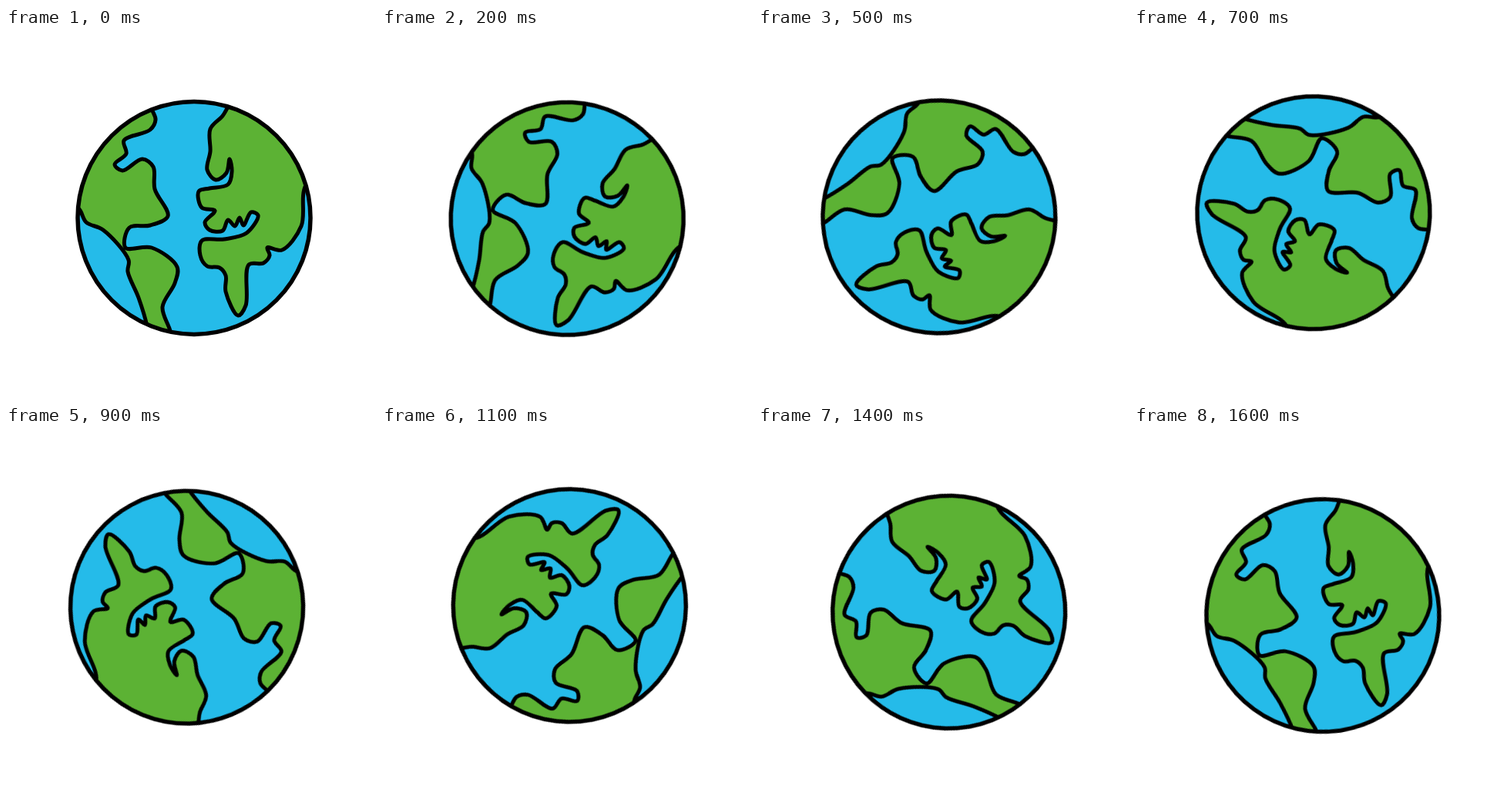
Animation of 480x480 px, one loop 1700 ms. Source, as an HTML page:

```html
<!DOCTYPE html>
<html lang="en">
<head>
<meta charset="utf-8">
<title>Spinning globe</title>
<style>
  html, body { margin: 0; width: 100%; height: 100%; overflow: hidden; background: #fff; }
  svg { display: block; width: 100vw; height: 100vh; }
  #globe { transform-box: view-box; transform-origin: 240.4px 239.8px; }
  .land { fill: #5cb234; stroke: #000; stroke-width: 5; stroke-linejoin: round; }
</style>
</head>
<body>
<svg viewBox="0 0 480 480">
  <clipPath id="disc"><circle cx="244" cy="246.4" r="151"/></clipPath>
  <g id="globe">
    <circle cx="244" cy="246.4" r="151" fill="#25bbe9"/>
    <g clip-path="url(#disc)">
      <path id="west" class="land"/>
      <path id="east" class="land"/>
    </g>
    <circle cx="244" cy="246.4" r="151" fill="none" stroke="#000" stroke-width="5.5"/>
  </g>
</svg>
<script>
// Key points of each coast; the loops close outside the disc
const coasts = {
  west: `189,105 194,119 187,132 153,146 156,163 141,177 151,185 177,170 191,180
    193,209 210,244 187,256 160,259 155,285 189,285 222,310 219,331 203,362 213,393
    216,412 186,412 183,387 172,350 158,316 159,301 126,262 104,252 94,234
    70,225 60,130 100,60 180,75`,
  east: `287,104 281,114 265,131 265,160 261,184 272,197 286,188 290,170 293,186
    288,203 264,208 250,212 254,233 271,237 258,252 264,262 281,263 288,249 297,257
    303,246 308,256 318,239 327,243 312,266 283,274 254,276 252,295 261,309 277,311
    285,321 285,342 301,373 311,360 315,307 334,305 342,295 339,285 358,288 383,257
    389,204 430,170 400,60 310,60`
};

const dist = (a, b) => Math.hypot(a[0] - b[0], a[1] - b[1]);

// Bezier handle at b on the side of c, for a centripetal spline
function handle(a, b, c) {
  const near = dist(b, c), far = dist(a, b);
  const s = Math.sqrt(near), t = Math.sqrt(far);
  return b.map((v, j) =>
    (far * c[j] - near * a[j] + (2 * far + 3 * s * t + near) * v) / (3 * t * (s + t)));
}

function loop(text) {
  const pts = text.trim().split(/\s+/).map(p => p.split(',').map(Number));
  const at = i => pts[(i + pts.length) % pts.length];
  return `M${at(0)}` + pts.map((p, i) => {
    const next = at(i + 1);
    return `C${handle(at(i - 1), p, next)} ${handle(at(i + 2), next, p)} ${next}`;
  }).join('') + 'Z';
}

for (const id in coasts)
  document.getElementById(id).setAttribute('d', loop(coasts[id]));

// Key poses [step, degrees]; the globe turns evenly in whole steps between them
const poses = [[0, 0], [6, 90], [7, 119.7], [9, 157.3], [11, 231.5], [13, 290.5], [16, 351.3], [17, 360]];
const STEPS = 17;

document.getElementById('globe').animate(
  poses.map(([step, deg], i) => ({
    offset: step / STEPS,
    transform: `rotate(${deg}deg)`,
    easing: `steps(${i < poses.length - 1 ? poses[i + 1][0] - step : 1}, end)`
  })),
  { duration: 100 * STEPS, iterations: Infinity }
);
</script>
</body>
</html>
```
